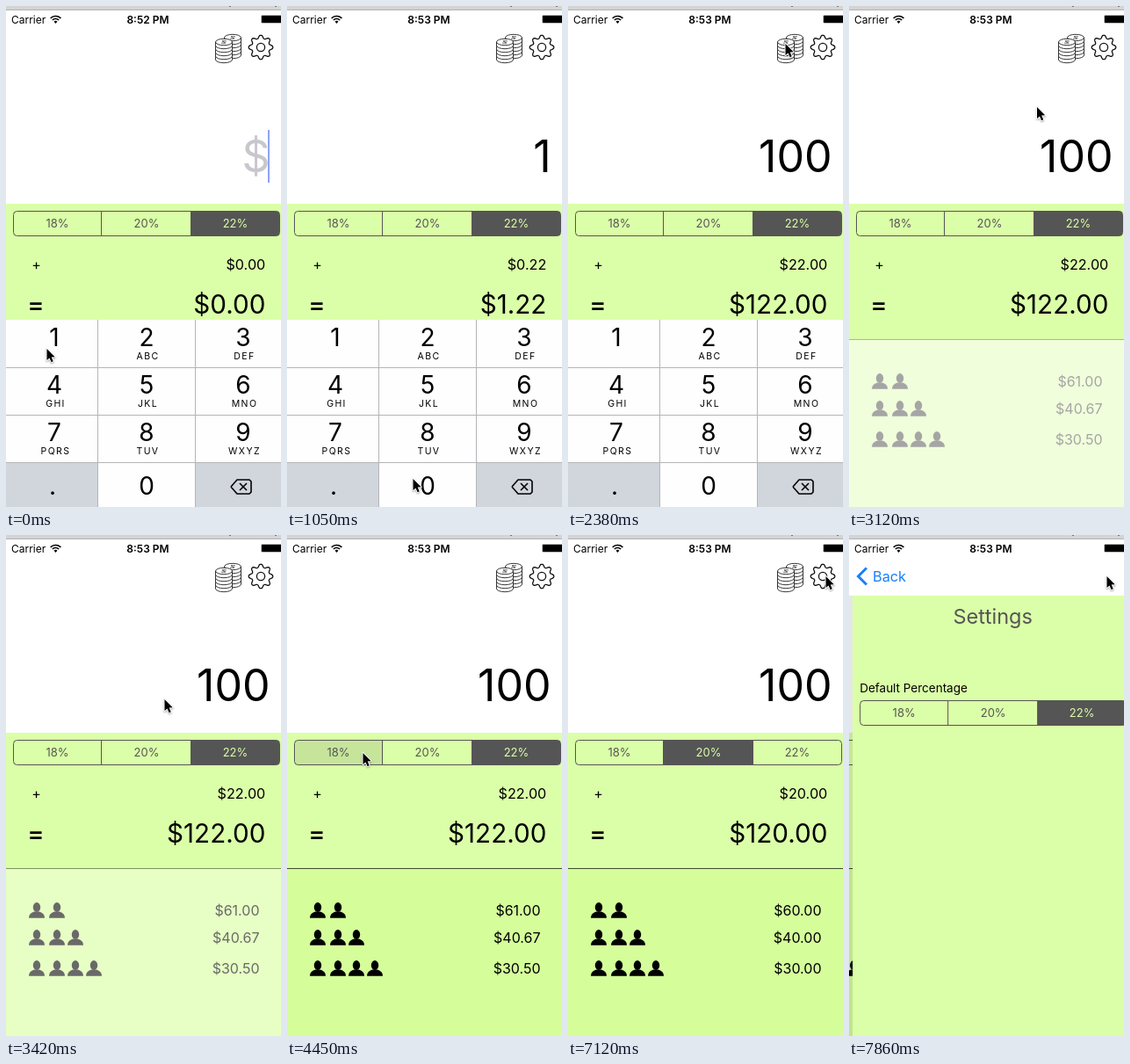
An HTML page with a canvas that plays this animation: 313 by 570 pixels, repeating every 8000 ms.

```html
<!DOCTYPE html>
<html lang="en">
<head>
<meta charset="utf-8">
<title>Tip calculator</title>
<style>
html, body { margin: 0; width: 100%; height: 100%; overflow: hidden; background: #fff; }
canvas { display: block; width: 313px; height: 570px; }
</style>
</head>
<body>
<canvas id="stage"></canvas>
<script>
const W = 313, H = 570, SCREEN = 320;
const LOOP = 8000, TICK = 148.4, LAST_TICK = 53;
const GREEN = '#dbffa8', PANEL = '#d5fe9b', DARK = '#555', BLUE = '#157efb';
const FONT = 'Inter, Roboto, "Liberation Sans", sans-serif';

const canvas = document.getElementById('stage');
const ctx = canvas.getContext('2d');
const dpr = window.devicePixelRatio || 1;
canvas.width = W * dpr;
canvas.height = H * dpr;

// Pointer stops: tick, x, y
const POINTER = [
  [0, 46, 388], [2, 46, 388], [7, 143, 536], [11, 143, 536],
  [16, 247, 41], [19, 247, 41], [23, 180, 185], [25, 134, 227],
  [28, 86, 246], [34, 86, 246], [36, 131, 246], [40, 131, 246],
  [43, 262, 119], [44, 262, 119], [48, 293, 45], [54, 293, 45]
];
const KEYS = [
  ['1', ''], ['2', 'ABC'], ['3', 'DEF'],
  ['4', 'GHI'], ['5', 'JKL'], ['6', 'MNO'],
  ['7', 'PQRS'], ['8', 'TUV'], ['9', 'WXYZ'],
  ['.', ''], ['0', ''], ['', '']
];
const COLS = [0, 105, 216, 320];
const RATES = [18, 20, 22];

const clamp = v => Math.max(0, Math.min(1, v));
const smooth = v => { v = clamp(v); return v * v * (3 - 2 * v); };
const within = (k, a, b) => k >= a && k <= b;
const money = v => '$' + v.toFixed(2);

function rect(x, y, w, h, color) {
  ctx.fillStyle = color;
  ctx.fillRect(x, y, w, h);
}

function text(str, x, y, size, { align = 'left', color = '#000', weight = 400, gap = 0 } = {}) {
  ctx.font = `${weight} ${size}px ${FONT}`;
  ctx.letterSpacing = gap + 'px';
  ctx.textAlign = align;
  ctx.fillStyle = color;
  ctx.fillText(str, x, y);
  ctx.letterSpacing = '0px';
}

function line(points, width, color = '#000') {
  ctx.beginPath();
  points.forEach(([x, y]) => ctx.lineTo(x, y));
  ctx.lineWidth = width;
  ctx.strokeStyle = color;
  ctx.stroke();
}

function layer(alpha, draw) {
  if (alpha <= 0) return;
  ctx.save();
  ctx.globalAlpha *= alpha;
  draw();
  ctx.restore();
}

function segments(y, selected, pressed) {
  const edges = [8.5, 108.5, 210.5, 311.5];
  ctx.save();
  ctx.beginPath();
  ctx.roundRect(8.5, y + 0.5, 303, 28, 4);
  ctx.save();
  ctx.clip();
  const fill = (i, color) => rect(edges[i], y, edges[i + 1] - edges[i], 29, color);
  if (pressed >= 0) fill(pressed, 'rgba(85,85,85,0.15)');
  fill(selected, DARK);
  ctx.restore();
  ctx.lineWidth = 1;
  ctx.strokeStyle = DARK;
  ctx.stroke();
  edges.slice(1, 3).forEach(x => line([[x, y], [x, y + 29]], 1, DARK));
  RATES.forEach((r, i) => text(r + '%', [58.5, 160, 261][i], y + 19, 13,
    { align: 'center', color: i === selected ? GREEN : DARK }));
  ctx.restore();
}

function person(x, y) {
  ctx.fillStyle = '#000';
  ctx.beginPath();
  ctx.ellipse(x, y + 5.5, 4.2, 5.4, 0, 0, 7);
  ctx.fill();
  ctx.beginPath();
  ctx.moveTo(x - 9, y + 17.7);
  ctx.quadraticCurveTo(x - 9, y + 12.5, x - 3, y + 10.5);
  ctx.lineTo(x + 3, y + 10.5);
  ctx.quadraticCurveTo(x + 9, y + 12.5, x + 9, y + 17.7);
  ctx.fill();
}

// The panel fades in as one group over white
function splitPanel(total, alpha) {
  if (alpha <= 0) return;
  rect(0, 380, SCREEN, H - 380, PANEL);
  [418, 449, 484].forEach((y, row) => {
    const count = row + 2;
    [35, 58, 79, 100].slice(0, count).forEach(x => person(x, y));
    text(money(total / count), 288.5, y + 14.5, 16, { align: 'right' });
  });
  layer(1 - alpha, () => rect(0, 380, SCREEN, H - 380, '#fff'));
  layer(alpha, () => rect(0, 379, SCREEN, 1, '#3f4a2e'));
}

function backspace(x, y) {
  const path = [[-12, 0], [-5, -8], [9, -8], [11, -6], [11, 6], [9, 8], [-5, 8], [-12, 0]];
  const at = pts => pts.map(([a, b]) => [x + a, y + b]);
  ctx.lineJoin = 'round';
  line(at(path), 1.6);
  line(at([[-2, -4], [6, 4]]), 1.6);
  line(at([[-2, 4], [6, -4]]), 1.6);
}

function keyboard(top, pressed) {
  rect(0, top, SCREEN, H - 357, '#b4b5b8');
  KEYS.forEach(([digit, letters], i) => {
    const col = i % 3, row = Math.floor(i / 3), y = top + row * 54;
    const gray = i === 9 || i === 11 || digit === pressed;
    const x = COLS[col], mid = [55, 160, 270][col];
    rect(x, y + (row ? 1 : 0), COLS[col + 1] - x - 1, row ? 53 : 54, gray ? '#d1d5dc' : '#fefefe');
    const base = row === 3 ? 199 : 30 + row * 54;
    text(digit, digit === '.' ? 53 : mid, top + base, 28, { align: 'center' });
    text(letters, mid + 1.5, top + 45 + row * 54, 10.5, { align: 'center', gap: 1.4 });
  });
  backspace(268, top + 190);
}

function coinStack(x, y, count) {
  ctx.lineWidth = 0.9;
  ctx.strokeStyle = '#222';
  ctx.fillStyle = '#fff';
  for (let i = count - 1; i >= 0; i--) {
    const cy = y + i * 4;
    ctx.beginPath();
    ctx.ellipse(x, cy + 4, 9.5, 3.7, 0, 0, Math.PI);
    ctx.lineTo(x - 9.5, cy);
    ctx.ellipse(x, cy, 9.5, 3.7, 0, Math.PI, 2 * Math.PI);
    ctx.closePath();
    ctx.fill();
    ctx.stroke();
  }
  ctx.beginPath();
  ctx.ellipse(x, y, 9.5, 3.7, 0, 0, Math.PI);
  ctx.stroke();
  line([[x + 3, y - 1.2], [x - 2, y - 1.2], [x + 2, y + 1.2], [x - 3, y + 1.2]], 0.7, '#222');
}

function gear(x, y) {
  ctx.beginPath();
  for (let i = 0; i < 128; i++) {
    const a = i * Math.PI / 64;
    const r = 12 + 1.7 * Math.max(-1, Math.min(1, 1.2 * Math.cos(8 * a)));
    ctx.lineTo(x + r * Math.cos(a), y + r * Math.sin(a));
  }
  ctx.closePath();
  ctx.moveTo(x + 4.6, y);
  ctx.arc(x, y, 4.6, 0, 7);
  ctx.lineWidth = 1.3;
  ctx.strokeStyle = '#111';
  ctx.stroke();
}

function statusBar(k) {
  rect(0, 0, W, 4, '#d4d4d4');
  rect(0, 4, W, 1, '#b2b2b2');
  rect(254, 0, 2, 1, '#777');
  rect(306, 0, 2, 1, '#777');
  text('Carrier', 6, 19.5, 12);
  ctx.lineWidth = 1.6;
  ctx.strokeStyle = '#000';
  [8, 5].forEach(r => {
    ctx.beginPath();
    ctx.arc(56.5, 19.5, r, -Math.PI * 0.76, -Math.PI * 0.24);
    ctx.stroke();
  });
  ctx.fillStyle = '#000';
  ctx.beginPath();
  ctx.moveTo(56.5, 20);
  ctx.arc(56.5, 19.5, 2.6, -Math.PI * 0.76, -Math.PI * 0.24);
  ctx.fill();
  text(k < 4 ? '8:52 PM' : '8:53 PM', 161.5, 19.5, 12, { align: 'center', weight: 600 });
  ctx.beginPath();
  ctx.roundRect(290.5, 10.5, 24, 9, 1.5);
  ctx.lineWidth = 0.8;
  ctx.strokeStyle = '#aaa';
  ctx.stroke();
  rect(291, 11, 22, 8, '#000');
}

function navBar(p) {
  rect(0, 5, W, 64, '#fff');
  layer(1 - 1.3 * p, () => {
    coinStack(258, 36, 5);
    coinStack(248, 41, 5);
    gear(290, 47);
  });
  layer(p, () => {
    ctx.lineJoin = 'miter';
    line([[20, 37.5], [10.5, 47], [20, 56.5]], 3, BLUE);
    text('Back', 27 + 100 * (1 - p) ** 2, 53, 16.3, { color: BLUE });
  });
}

function caretAlpha(k) {
  if (k === 0) return 0.62;
  return within(k, 1, 5) || within(k, 9, 14) ? 1 : k === 6 || k === 15 ? 0.5 : 0;
}

function calculator(k) {
  const amount = k < 2 ? 0 : k < 9 ? 1 : k < 11 ? 10 : 100;
  const selected = k < 31 ? 2 : k < 40 ? 0 : 1;
  const pressed = k === 30 ? 0 : k === 39 ? 1 : -1;
  const tip = amount * RATES[selected] / 100;

  rect(0, 69, SCREEN, H - 69, '#fff');
  text(amount ? String(amount) : '$', 300.5, 189, 50,
    { align: 'right', color: amount ? '#000' : '#c7c7cd' });
  layer(caretAlpha(k), () => rect(298, 141, 2, 60, '#4a6df0'));

  rect(0, 225, SCREEN, 155, GREEN);
  segments(233, selected, pressed);
  text('+', 34.5, 299.5, 16, { align: 'center' });
  text(money(tip), 295.3, 299.5, 16.2, { align: 'right' });
  text('=', 34, 349.5, 29, { align: 'center', weight: 500 });
  text(money(amount + tip), 295.3, 350, 29.6, { align: 'right' });

  splitPanel(amount + tip, clamp((k - 18) / 8.5));
  const slide = smooth((k - 17.5) / 3);
  if (slide < 1) {
    const key = within(k, 1, 2) ? '1' : within(k, 8, 9) || within(k, 11, 12) ? '0' : null;
    if (k <= 18) rect(0, 380, SCREEN, H - 380, '#fff');
    keyboard(357 + 213 * slide, key);
  }
}

function settings() {
  rect(0, 69, SCREEN, H - 69, GREEN);
  text('Settings', 159.5, 101, 23.5, { align: 'center', color: DARK });
  text('Default Percentage', 8, 179, 13.5);
  segments(188, 2, -1);
}

function pointer(k) {
  let i = 0;
  while (i < POINTER.length - 2 && k >= POINTER[i + 1][0]) i++;
  const [t0, x0, y0] = POINTER[i], [t1, x1, y1] = POINTER[i + 1];
  const p = smooth((k - t0) / (t1 - t0));
  const x = x0 + (x1 - x0) * p, y = y0 + (y1 - y0) * p;
  const shape = [[0, 0], [0, 13], [3, 10.4], [5.1, 15.2], [7.2, 14.3], [5.2, 9.5], [9.2, 9.3]];
  ctx.save();
  ctx.translate(x + 0.5, y + 2);
  ctx.beginPath();
  shape.forEach(([a, b]) => ctx.lineTo(a, b));
  ctx.closePath();
  ctx.lineJoin = 'round';
  ctx.lineWidth = 2;
  ctx.strokeStyle = '#fff';
  ctx.shadowColor = 'rgba(0,0,0,0.35)';
  ctx.shadowBlur = 2;
  ctx.shadowOffsetY = 1;
  ctx.stroke();
  ctx.shadowColor = 'transparent';
  ctx.fillStyle = '#000';
  ctx.fill();
  ctx.restore();
}

// Critically damped push between the two screens
function pushProgress(k) {
  const u = Math.max(0, (k - 50.6) * 2.64);
  return 1 - (1 + u) * Math.exp(-u);
}

function draw(k) {
  ctx.setTransform(dpr, 0, 0, dpr, 0, 0);
  rect(0, 0, W, H, '#fff');
  const p = pushProgress(k);
  ctx.save();
  ctx.translate(-96 * p, 0);
  calculator(k);
  ctx.restore();
  if (p > 0) {
    rect(0, 69, W, H - 69, `rgba(0,0,0,${0.1 * p})`);
    ctx.save();
    ctx.translate(SCREEN * (1 - p), 0);
    settings();
    ctx.restore();
  }
  navBar(p);
  statusBar(k);
  pointer(k);
}

const start = performance.now();
function frame() {
  const t = (performance.now() - start) % LOOP;
  draw(Math.min(LAST_TICK, Math.floor((t + 16) / TICK)));
  requestAnimationFrame(frame);
}
frame();
</script>
</body>
</html>
```
